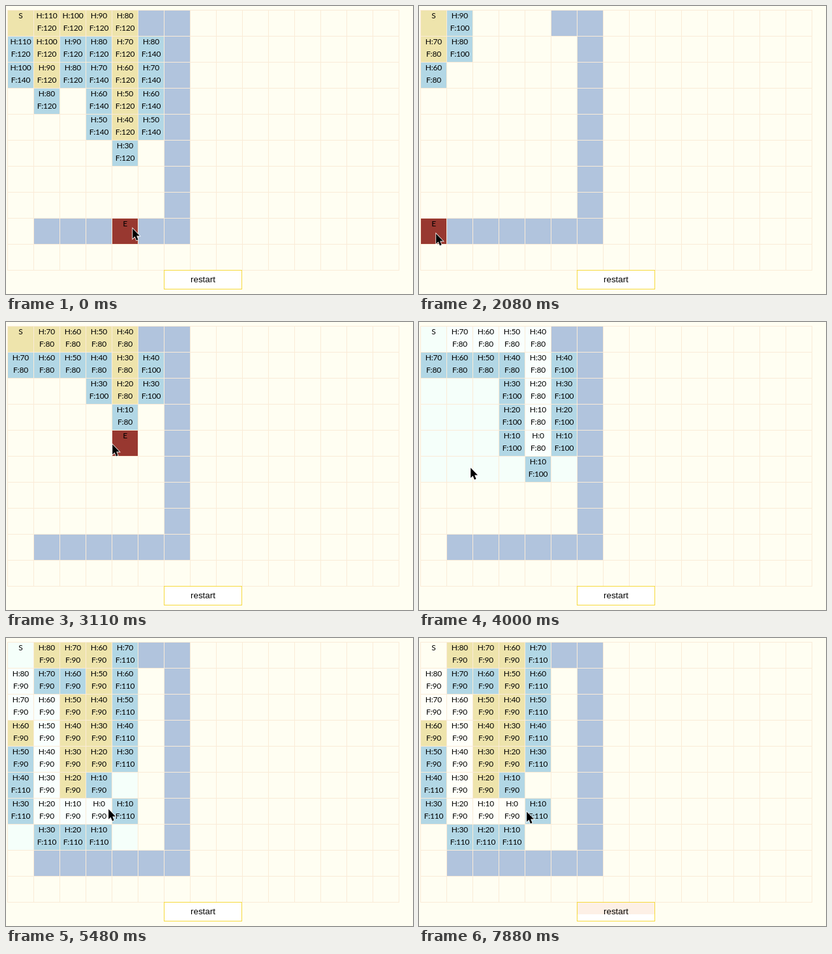
Animation of 624 by 443 pixels, one loop 8000 ms. Source, as an HTML page:

```html
<!DOCTYPE html>
<html lang="en">
<head>
<meta charset="utf-8">
<title>Path search</title>
<style>
  html, body { margin: 0; width: 100%; height: 100%; overflow: hidden; background: #fffef2; }
  svg { display: block; width: 624px; height: 443px; }
  text { text-anchor: middle; fill: #000; font: 12px Lato, sans-serif; letter-spacing: -0.2px; }
  .label { font: 13.33px "Liberation Sans", Arial, sans-serif; letter-spacing: 0; }
</style>
</head>
<body>
<svg id="stage" viewBox="0 0 624 443"></svg>
<script>
const LOOP = 8000, SIZE = 40, LEFT = 2, TOP = 6, COLS = 15, ROWS = 10;
const IVORY = '#fffef2', LINE = '#faebd7', WALL = '#b1c4dd', GOAL = '#983830';
const FILL = { k: '#eee4ac', b: '#b2d7e5', p: '#f9fffd', m: '#f5fffa' };
const WARM = { ...FILL, p: '#fffff8', m: IVORY };

// Cells: k closed, b open, B open on a longer way, p path, m tinted blank.
const toEast = ['kkkkk', 'bkbbkB', 'BkbBkB', '.b.BkB', '...BkB', '....b'];
const eastDone = ['ppkkk', 'bpkbkB', 'BppkkB', 'BkpkkB', 'BkpkkB', 'Bkpkbm',
  'BkpppB', 'BkbbpB', 'm...p', 'mmmmBm'];
const lastDone = ['pkkkB', 'pbbkB', 'ppkkB', 'kpkkB', 'bpkkB', 'Bpkbm', 'BpppB', 'mBBBm'];

// start time, goal column, goal row, cells, state
const scenes = [
  [0, 4, 8, toEast, 'search'],
  [140, 4, 8, eastDone, 'done'],
  [1190, 4, 8, eastDone, 'warm'],
  [2080, 0, 8, ['kB', 'kB', 'b'], 'search'],
  [2230, 0, 8, [...Array(8).fill('pB'), 'p', 'Bm'], 'done'],
  [3110, 4, 4, ['kkkkk', 'bbbbkB', '...BkB', '....b'], 'search'],
  [3260, 4, 4, ['ppppp', 'bbbbpB', ...Array(3).fill('mmmBpB'), 'mmmmBm'], 'done'],
  [4300, 1, 5, ['kkB', 'bkB', 'BkB', '.b'], 'search'],
  [4450, 1, 5, ['ppB', 'bpB', ...Array(4).fill('BpB'), 'mB'], 'done'],
  [5340, 3, 6, ['kkkkB', 'bbbkB', '..BkB', '..BkB', '...b'], 'search'],
  [5480, 3, 6, lastDone, 'done'],
  [6530, 3, 6, lastDone, 'warm']
];

// time, x, y
const moves = [
  [0, 193, 342], [1040, 193, 341], [1190, 114, 286], [1340, 6, 305],
  [1490, -6, 334], [1630, 15, 361], [1780, 25, 350], [2520, 25, 343],
  [2670, 124, 202], [2820, 162, 188], [3850, 98, 207], [4000, 78, 224],
  [4900, 146, 259], [5040, 156, 263], [7880, 164, 267]
];

const stage = document.getElementById('stage');

function add(parent, tag, attrs, content = '') {
  const node = document.createElementNS('http://www.w3.org/2000/svg', tag);
  for (const key in attrs) node.setAttribute(key, attrs[key]);
  node.textContent = content;
  return parent.appendChild(node);
}

const rect = (parent, x, y, width, height, fill) =>
  add(parent, 'rect', { x, y, width, height, fill });

const cell = (parent, c, r, fill) =>
  rect(parent, LEFT + c * SIZE + 1, TOP + r * SIZE + 1, SIZE - 1, SIZE - 1, fill);

const write = (parent, c, r, line, content) =>
  add(parent, 'text', { x: LEFT + c * SIZE + 20.5, y: TOP + r * SIZE + 13 + line * 19 }, content);

function drawGrid() {
  rect(stage, 0, 0, 624, 443, IVORY);
  for (let c = 0; c <= COLS; c++) rect(stage, LEFT + c * SIZE, TOP, 1, ROWS * SIZE + 1, LINE);
  for (let r = 0; r <= ROWS; r++) rect(stage, LEFT, TOP + r * SIZE, COLS * SIZE + 1, 1, LINE);
  cell(stage, 5, 0, WALL);
  for (let r = 0; r < 9; r++) cell(stage, 6, r, WALL);
  for (let c = 1; c < 6; c++) cell(stage, c, 8, WALL);
  add(stage, 'rect', { x: 242.5, y: 406.5, width: 119, height: 29, fill: '#fff', stroke: '#f6d93c' });
}

function drawScene([, goalC, goalR, rows, state]) {
  const group = add(stage, 'g', { visibility: 'hidden' });
  const fills = state === 'warm' ? WARM : FILL;
  if (state === 'search') {
    cell(group, goalC, goalR, GOAL);
    write(group, goalC, goalR, 0, 'E');
  }
  rows.forEach((row, r) => [...row].forEach((kind, c) => {
    if (kind === '.') return;
    const tint = c + r === 0 && kind === 'p' ? 'm' : kind.toLowerCase();
    cell(group, c, r, fills[tint]);
    if (kind === 'm' || c + r === 0) return;
    const h = 10 * (Math.abs(goalC - c) + Math.abs(goalR - r));
    const f = 10 * (goalC + goalR) + (kind === 'B' ? 20 : 0);
    write(group, c, r, 0, 'H:' + h);
    write(group, c, r, 1, 'F:' + f);
  }));
  write(group, 0, 0, 0, 'S');
  if (state === 'warm') rect(group, 243, 407, 118, 18, '#fdf0e6');
  return group;
}

drawGrid();
const groups = scenes.map(drawScene);
add(stage, 'text', { x: 302, y: 425, class: 'label' }, 'restart');
const pointer = add(stage, 'path', {
  d: 'M1.2 0.3V15.8L4.6 12.6L7 18.4L9.6 17.3L7.2 11.6H12Z',
  fill: '#000', stroke: '#fff', 'stroke-width': 1.6, 'paint-order': 'stroke'
});

const indexAt = (steps, t) => steps.findLastIndex(step => step[0] <= t);
const start = performance.now();

function render() {
  const t = (performance.now() - start) % LOOP;
  const current = indexAt(scenes, t);
  groups.forEach((group, i) => group.setAttribute('visibility', i === current ? 'visible' : 'hidden'));
  const [, x, y] = moves[indexAt(moves, t)];
  pointer.setAttribute('transform', `translate(${x} ${y})`);
  requestAnimationFrame(render);
}
render();
</script>
</body>
</html>
```
